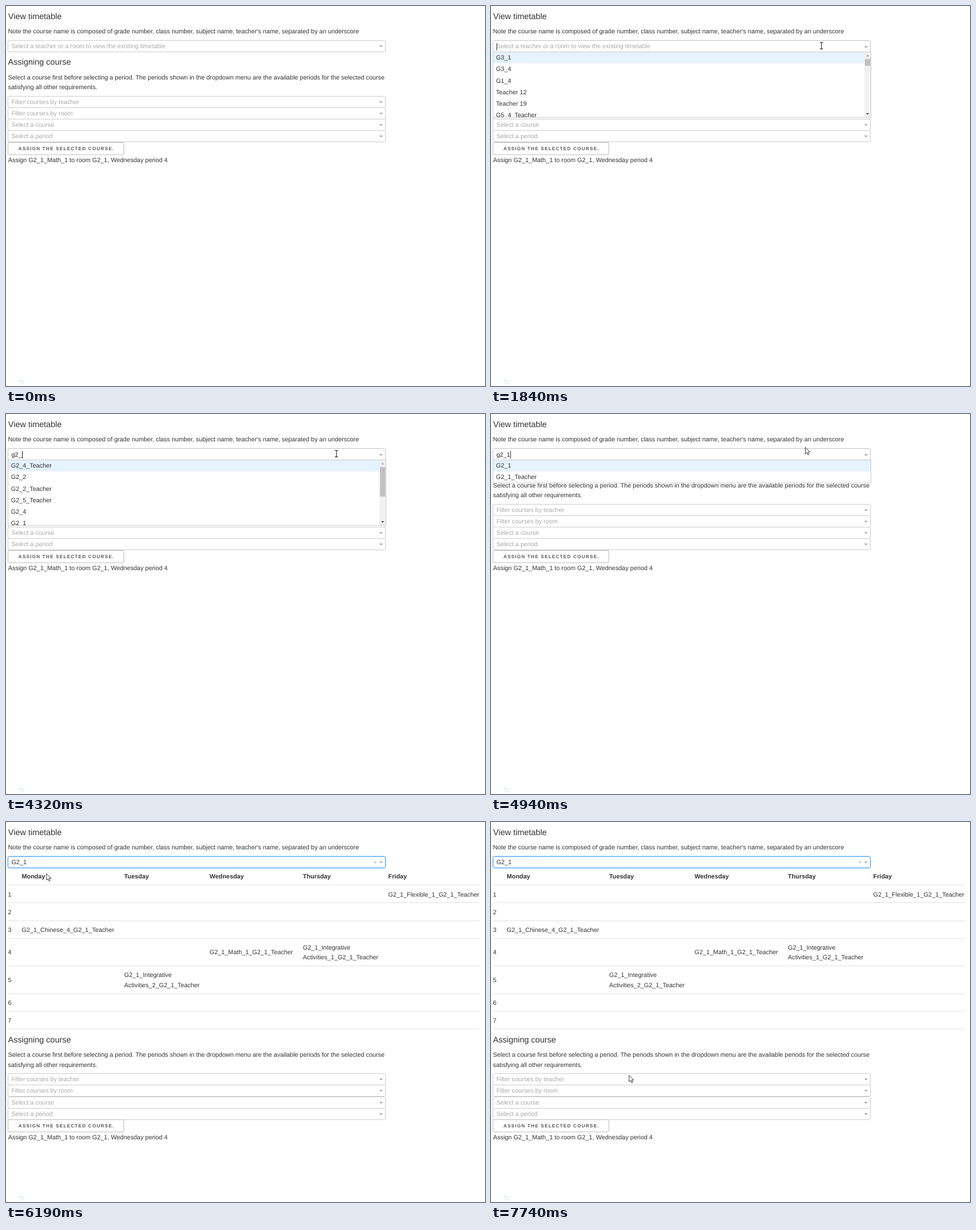
Write an HTML page that moves like this. It is 839 px wide and 667 px high and loops after 8000 ms.

```html
<!DOCTYPE html>
<html lang="en">
<head>
<meta charset="utf-8">
<title>Timetable</title>
<style>
  html, body { margin: 0; width: 100%; height: 100%; overflow: hidden; background: #fff; }
  svg { display: block; width: 839px; height: 667px; }
  text { font: 10.86px "Liberation Sans", Arial, sans-serif; fill: #323232; text-rendering: geometricPrecision; white-space: pre; }
  .h { font-size: 14.48px; }
  .b { font-weight: bold; }
  .hint { fill: #aaa; }
  .typed { fill: #222; }
  .button { font-size: 8.2px; font-weight: bold; letter-spacing: 1.2px; fill: #555; }
</style>
</head>
<body>
<svg id="stage" viewBox="0 0 839 667">
  <defs>
    <clipPath id="listClip"><rect x="0" y="80" width="666" height="115"/></clipPath>
  </defs>
  <g id="page"></g>
  <g id="pointer"></g>
</svg>
<script>
const LOOP = 8000;
const HINT = 'Select a teacher or a room to view the existing timetable';
const TABLE_HEIGHT = 283.4;

const ALL = ['G3_1', 'G3_4', 'G1_4', 'Teacher 12', 'Teacher 19', 'G5_4_Teacher'];
const ROOMS = ['G3_1', 'G3_4', 'G1_4', 'G5_4_Teacher', 'G4_2', 'G1_1_Teacher'];
const GRADE2 = ['G2_4_Teacher', 'G2_2', 'G2_2_Teacher', 'G2_5_Teacher', 'G2_4', 'G2_1'];
const CLASS1 = ['G2_1', 'G2_1_Teacher'];

// caret: x position, 0 when hidden; thumb: scrollbar thumb height, 0 for none
const views = [
  [0, {}],
  [1840, { list: ALL, thumb: 12, caret: 9.5 }],
  [2150, { list: ALL, thumb: 12 }],
  [2770, { list: ALL, thumb: 12, caret: 9.5 }],
  [3090, { list: ROOMS, thumb: 12, query: 'g', caret: 15.9 }],
  [3700, { list: GRADE2, thumb: 52, query: 'g2', caret: 22 }],
  [4320, { list: GRADE2, thumb: 52, query: 'g2_', caret: 28 }],
  [4940, { list: CLASS1, query: 'g2_1', caret: 33.8 }],
  [5570, { list: CLASS1, query: 'g2_1' }],
  [5870, { list: CLASS1, query: 'g2_1', clicked: true }],
  [6190, { chosen: 'G2_1' }]
];

// time, x, y, shape
const pointers = [
  [0, 0, 0, ''],
  [290, 781.5, 664.5, 'arrow'],
  [600, 541.5, 147.5, 'arrow'],
  [920, 582.5, 30.5, 'arrow'],
  [1220, 577.5, 59.5, 'arrow'],
  [1530, 577.5, 69.5, 'arrow'],
  [1840, 578.8, 69.8, 'beam'],
  [4940, 550.5, 58.5, 'arrow'],
  [5250, 306.5, 84.5, 'arrow'],
  [5570, 70.9, 90.5, 'arrow'],
  [6800, 362.5, 268.5, 'arrow'],
  [7120, 463.5, 398.5, 'arrow'],
  [7420, 443.5, 382.5, 'arrow'],
  [7740, 241.9, 444.5, 'arrow']
];

const shapes = {
  '': '',
  arrow: '<path d="M0 0V11.6L2.7 9.1 4.5 13.3 6.3 12.5 4.6 8.4H8.3Z" fill="#fff" stroke="#222" stroke-width=".9"/>',
  beam: '<path d="M-2.8 -5.6H2.8M0 -5.6V5.6M-2.8 5.6H2.8" fill="none" stroke="#333" stroke-width="1.2"/>'
};

const text = (x, y, s, cls = '') => `<text x="${x}" y="${Math.round(y)}" class="${cls}">${s}</text>`;
const rect = (x, y, w, h, fill, extra = '') =>
  `<rect x="${x}" y="${y}" width="${w}" height="${h}" fill="${fill}" ${extra}/>`;
const path = (d, stroke, extra = '') => `<path d="${d}" fill="none" stroke="${stroke}" ${extra}/>`;
const triangle = (x, y, half, h, fill) =>
  `<path d="M${x - half} ${y}h${2 * half}l${-half} ${h}z" fill="${fill}"/>`;

function select(top, label, { cls = 'hint', stroke = '#ccc', open = false, lift = 0 } = {}) {
  const y = Math.round(top);
  return rect(3.5, y + .5, 661, 20, '#fff', `rx="2.5" stroke="${stroke}"`) +
    text(9.4, top + 14 + lift, label, cls) +
    (open ? triangle(656.8, y + 12.6, 3.1, -2.8, '#999') : triangle(656.8, y + 9.4, 3.1, 2.8, '#999'));
}

function assignForm(dy) {
  const hints = ['Filter courses by teacher', 'Filter courses by room', 'Select a course', 'Select a period'];
  const buttonTop = Math.round(238.8 + dy);
  return text(3.6, 103.4 + dy, 'Assigning course', 'h') +
    text(3.5, 128.8 + dy, 'Select a course first before selecting a period. The periods shown in the dropdown menu are the available periods for the selected course') +
    text(3.5, 146.2 + dy, 'satisfying all other requirements.') +
    hints.map((hint, i) => select(157.6 + 20.25 * i + dy, hint)).join('') +
    rect(3.5, buttonTop + .5, 203, 21.5, '#fff', 'rx="2.5" stroke="#bbb"') +
    text(21.8, buttonTop + 14, 'ASSIGN THE SELECTED COURSE.', 'button') +
    text(3.8, 273.6 + dy, 'Assign G2_1_Math_1 to room G2_1, Wednesday period 4');
}

function timetable() {
  const columns = [27.5, 207, 356.5, 520, 669.5];
  const days = ['Monday', 'Tuesday', 'Wednesday', 'Thursday', 'Friday'];
  const lines = [110, 141, 173, 204, 252, 301, 332, 363];
  const rows = [126.7, 157.7, 188.8, 228.6, 277, 316.8, 347.8];
  const lessons = [
    [4, 126.7, 'G2_1_Flexible_1_G2_1_Teacher'],
    [0, 188.8, 'G2_1_Chinese_4_G2_1_Teacher'],
    [2, 228.6, 'G2_1_Math_1_G2_1_Teacher'],
    [3, 219.9, 'G2_1_Integrative'],
    [3, 237.3, 'Activities_1_G2_1_Teacher'],
    [1, 268.3, 'G2_1_Integrative'],
    [1, 285.7, 'Activities_2_G2_1_Teacher']
  ];
  return days.map((day, i) => text(columns[i], 99.4, day, 'b')).join('') +
    lines.map(y => path(`M3.6 ${y + .5}H829.5`, '#e1e1e1')).join('') +
    rows.map((y, i) => text(3.6, y + 3.8, i + 1)).join('') +
    lessons.map(([col, y, name]) => text(columns[col], y + 3.8, name)).join('');
}

function dropdown(list, thumb) {
  const bottom = thumb ? 195.5 : 121;
  const options = list.map((name, i) => text(8.7, 94.2 + 20.2 * i, name)).join('');
  const bar = thumb
    ? rect(654, 81, 11, 114, '#f1f1f1') + rect(655, 93, 9.5, thumb, '#c1c1c1') +
      triangle(659.7, 88.4, 2.8, -3, '#a3a3a3') + triangle(659.7, 188, 2.8, 3, '#505050')
    : '';
  return rect(3.5, 80.5, 662, bottom - 80.5, '#fff', 'stroke="#ccc"') +
    rect(4, 81, 661, 19.6, '#e5f2ff') +
    `<g clip-path="url(#listClip)">${options}</g>` + bar;
}

function chooser({ list, query, chosen, caret, clicked, thumb }) {
  if (chosen) {
    return rect(2.5, 59.5, 663, 22, 'none', 'rx="3.5" stroke="#007eff" stroke-opacity=".14"') +
      select(60, chosen, { cls: '', stroke: '#339af8' }) +
      path('M644.5 68.6l4 4m0 -4l-4 4', '#999', 'stroke-width=".9"');
  }
  if (!list) return select(60, HINT);
  return select(60, query || HINT, { cls: query ? 'typed' : 'hint', open: true, lift: query ? 1 : 0, stroke: '#c4c4c4' }) +
    dropdown(list, thumb) +
    (caret ? rect(caret, 65, 1, 13, '#222') : '') +
    (clicked
      ? path('M9.5 77l1.5 -1 1.5 1 1.5 -1 1.5 1 1.5 -1 1.5 1 1.5 -1 1.5 1', '#f33', 'stroke-width=".8"') +
        '<circle cx="70.5" cy="90.5" r="8.6" fill="#f3f53c" fill-opacity=".78"/>'
      : '');
}

const undoIcon = path('M23 655.8V659H26.2M23.2 658.6Q25 656.6 27.3 656.7A3.3 3.3 0 1 1 24.8 662.4', '#d3e8f8', 'stroke-width="1.1"');

const drawPage = view =>
  text(3.8, 23, 'View timetable', 'h') +
  text(3.5, 48.4, "Note the course name is composed of grade number, class number, subject name, teacher's name, separated by an underscore") +
  assignForm(view.chosen ? TABLE_HEIGHT : 0) +
  (view.chosen ? timetable() : '') +
  chooser(view) + undoIcon;

const drawPointer = ([, x, y, shape]) => `<g transform="translate(${x} ${y})">${shapes[shape]}</g>`;

const page = document.getElementById('page');
const pointer = document.getElementById('pointer');
const stepAt = (steps, t) => steps.findLast(step => step[0] <= t);
let shownView, shownPointer;

function render(now) {
  const t = Math.max(0, now - start) % LOOP;
  const view = stepAt(views, t);
  const spot = stepAt(pointers, t);
  if (view !== shownView) page.innerHTML = drawPage((shownView = view)[1]);
  if (spot !== shownPointer) pointer.innerHTML = drawPointer(shownPointer = spot);
  requestAnimationFrame(render);
}

const start = performance.now();
render(start);
</script>
</body>
</html>
```
